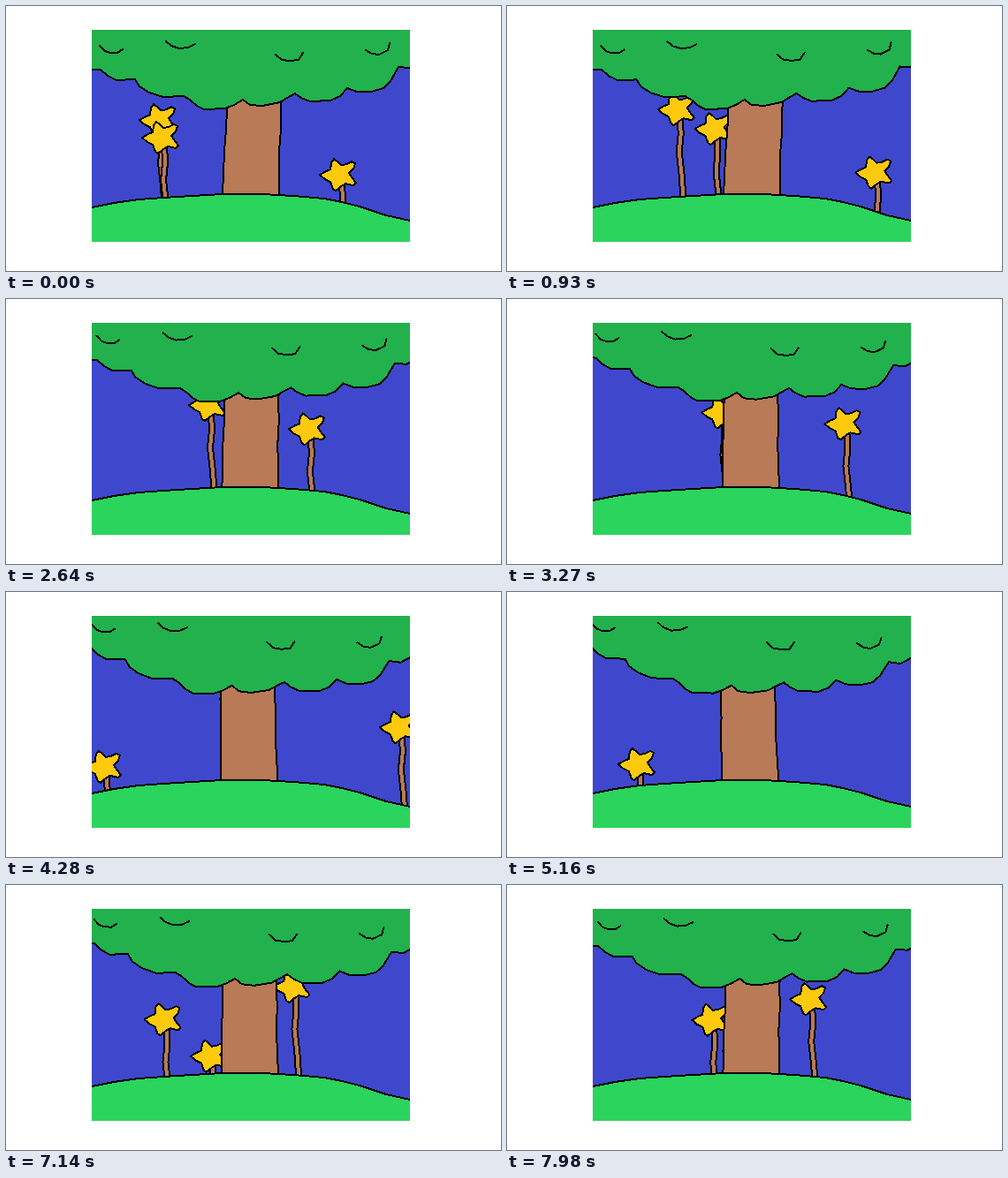
An HTML page for the animation above (8000 ms loop, 560 by 300 pixels).

```html
<!DOCTYPE html>
<html lang="en">
<head>
<meta charset="utf-8">
<title>Dancing stars</title>
<style>
html, body { margin: 0; width: 100%; height: 100%; overflow: hidden; background: #fff; }
svg { display: block; }
.ink { stroke: #000; stroke-width: 2; stroke-linejoin: round; stroke-linecap: round; }
.line { fill: none; }
.wood { fill: #b97a57; }
.leaf { fill: #22b14c; }
.gold { fill: #ffc90e; }
.grass { fill: #2bd45c; }
</style>
</head>
<body>
<svg width="560" height="300" viewBox="0 0 560 300" shape-rendering="crispEdges">
  <defs>
    <clipPath id="view"><rect x="97" y="27" width="360" height="240"/></clipPath>
    <g id="star">
      <path class="ink wood" d="M1 10 2 28 0 48 3 75 5 105 7 165H13L11 105 9 75 6 48 8 28 7 10Z"/>
      <path class="ink gold" d="M-21 0-14-4-9-6-8-14-5-18-1-15 3-11 9-12 15-15 19-13 17-7 12-2 16 4 20 9 17 12 8 10 3 13-3 18-6 16-9 8-15 5Z"/>
    </g>
  </defs>
  <g clip-path="url(#view)">
    <rect x="97" y="27" width="360" height="240" fill="#3f48cc"/>
    <g id="stars"></g>
    <path id="trunk" class="ink wood" d="M252 90 250 118 249 140 247 165 246 190 245 213 245 240H309L309 213 309 190 309 165 311 140 311 115 313 90Z"/>
    <path class="ink grass" d="M90 230 97 228 122 223 150 219 178 217 210 215 245 213 290 213 325 215 360 218 380 222 400 227 430 237 457 243 465 245V280H90Z"/>
    <g id="crown">
      <path class="ink leaf" d="M80-10V71L97 72 107 72 115 79 125 84 146 83 151 91 162 98 178 103 201 102 208 106 216 113 224 117 248 116 258 112 268 106 276 112 290 113 310 109 318 104 327 99 334 104 344 108 367 107 378 102 386 93 397 97 413 97 427 93 435 85 440 76 444 69 457 70 469 63 490 58V-10Z"/>
      <path class="ink line" d="M106 45 112 51 118 53 126 53 132 49M181 40 187 45 196 48 206 47 214 43M305 55 312 61 321 62 331 61 336 53M407 50 414 54 422 55 432 50 434 42"/>
    </g>
  </g>
</svg>
<script>
const LOOP = 8000, LEFT = 54, SPAN = 446;
const byId = id => document.getElementById(id);
const wave = (t, period, peak) => Math.cos(2 * Math.PI * (t - peak) / period);

// x: start, v: px per ms, y: mean height, amp/period/peak: bobbing
const dancers = [
  { x: 172, v: 0.0212, y: 122.3, amp: 7.3, period: 1595, peak: -70 },
  { x: 175, v: 0.0628, y: 146, amp: 7.3, period: 734, peak: 600 },
  { x: 376, v: 0.042, y: 192.3, amp: 5.8, period: 1010, peak: 285 }
];

for (const d of dancers) {
  d.el = document.createElementNS("http://www.w3.org/2000/svg", "use");
  d.el.setAttribute("href", "#star");
  byId("stars").append(d.el);
}

function draw(t) {
  const sway = 3.6 * ((1 + wave(t, 9200, 5300)) / 2 - 0.054);
  byId("crown").setAttribute("transform", `rotate(${sway} 265 -130)`);
  byId("trunk").setAttribute("transform", `rotate(${-1.1 * sway} 276 240)`);
  for (const d of dancers) {
    const x = LEFT + (d.x + d.v * t - LEFT) % SPAN;
    const y = d.y + d.amp * wave(t, d.period, d.peak);
    d.el.setAttribute("transform", `translate(${x} ${y})`);
  }
}

const start = performance.now();
function tick() {
  draw((performance.now() - start) % LOOP);
  requestAnimationFrame(tick);
}
draw(0);
requestAnimationFrame(tick);
</script>
</body>
</html>
```
